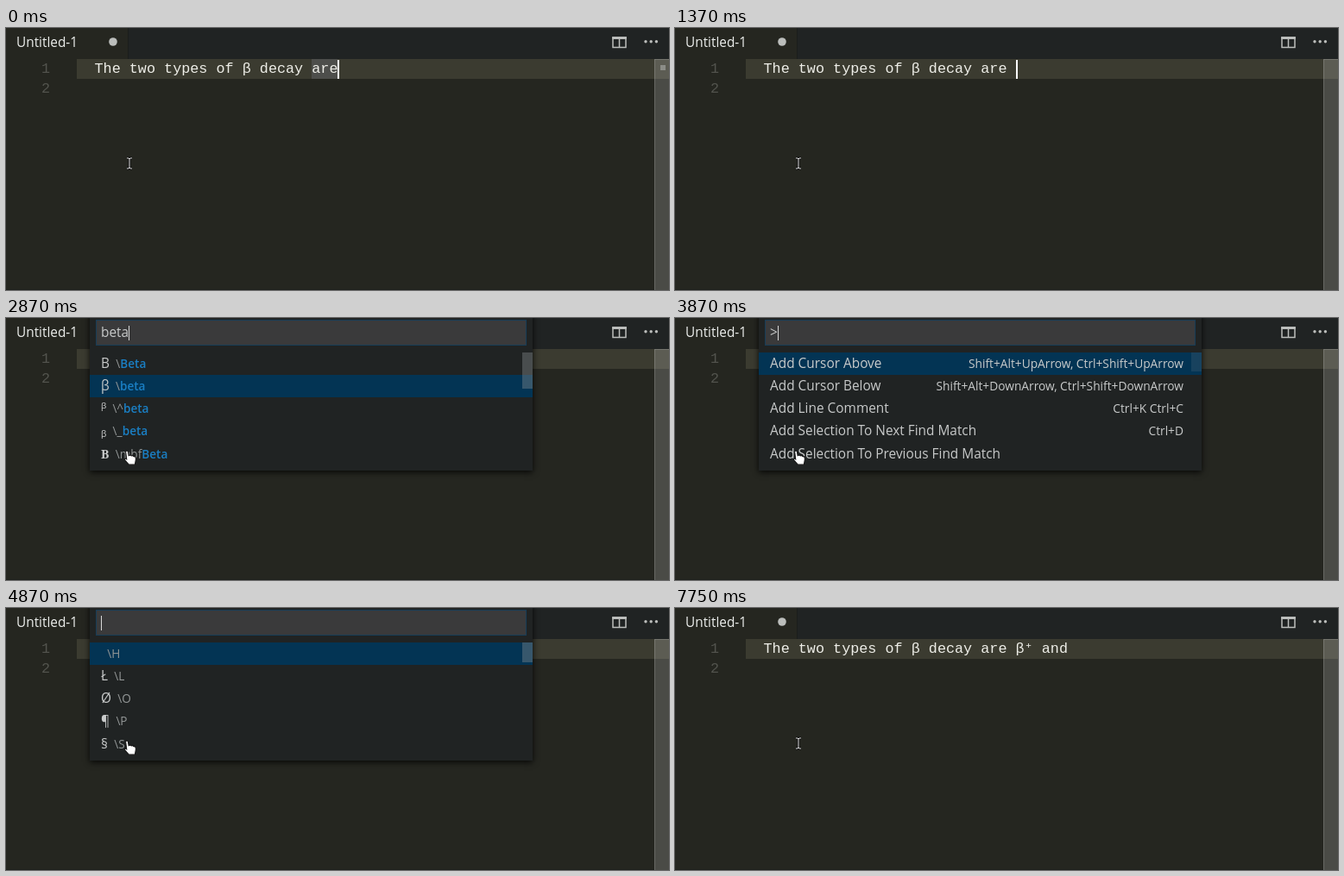
Animation of 768x304 px, one loop 8000 ms. Source, as an HTML page:

```html
<!DOCTYPE html>
<html lang="en">
<head>
<meta charset="utf-8">
<title>Symbol picker in a text editor</title>
<style>
  html, body { margin: 0; width: 100%; height: 100%; overflow: hidden; background: #252620; }
  #stage {
    position: relative; width: 768px; height: 304px; overflow: hidden; background: #252620;
    font: 15.4px "Open Sans", "Noto Sans", "DejaVu Sans", sans-serif; color: #c8caca; white-space: pre;
  }
  #stage div, svg { position: absolute; }
  .bar { left: 141px; top: 0; width: 627px; height: 36px; background: #202323; border-left: 1px solid #1b1d1b; box-sizing: border-box; }
  .title { left: 12px; top: 0; line-height: 33px; font-weight: 500; color: #eceeec; }
  .mono { font: 16.8px/23px "Liberation Mono", "DejaVu Sans Mono", monospace; }
  .number { left: 41px; color: #53544e; }
  .line { left: 82px; top: 36px; width: 686px; height: 23px; background: #3b3b30; }
  #text { left: 102.5px; top: 36px; color: #eeeee8; }
  #text .word { background: #4d4e4b; display: inline-block; height: 23px; vertical-align: top; }
  #text .caret { display: inline-block; width: 2px; height: 22px; margin: 1px -2px 0 0; background: #fff; vertical-align: top; }
  .ruler { left: 751px; top: 36px; width: 17px; height: 268px; box-sizing: border-box; background: rgba(255,255,255,.17); border: solid rgba(255,255,255,.16); border-width: 1px 0 0 1px; }
  #mark { left: 758px; top: 43px; width: 6px; height: 6px; background: #8c8d88; }
  .foot { left: 0; top: 303px; width: 751px; height: 1px; background: #1e201c; }
  #panel { left: 97px; top: -8px; width: 513px; background: #202323; box-shadow: 0 2px 7px rgba(0,0,0,.85); }
  .input { left: 7px; top: 9.5px; width: 499px; height: 30px; box-sizing: border-box; background: #3a3a3b; border: 1px solid #173d57; line-height: 28px; padding-left: 5px; }
  .input .caret { display: inline-block; width: 1px; height: 17px; background: #d8d8d8; vertical-align: middle; }
  .row { left: 0; width: 500px; height: 26.15px; line-height: 26.15px; padding-left: 13px; }
  .row.on { background: #033454; }
  .row b { color: #1a7fc4; font-weight: 600; }
  .keys { right: 21px; top: 0; font-size: 13.76px; }
  .code { font-size: 13.6px; color: #929696; margin-left: 7.3px; }
  .bold { font-family: "Noto Serif", "Liberation Serif", serif; font-weight: 700; font-size: 14px; }
  .slider { right: 0; top: 47.9px; width: 12px; background: rgba(140,145,148,.38); }
  .slider.faint { opacity: .4; }
</style>
</head>
<body>
<div id="stage">
  <div class="bar"></div>
  <div class="title">Untitled-1</div>
  <div class="line"></div>
  <div class="mono number" style="top:36px">1</div>
  <div class="mono number" style="top:59px">2</div>
  <div id="text" class="mono"></div>
  <div class="foot"></div>
  <div class="ruler"></div>
  <div id="mark"></div>
  <svg width="768" height="36" style="left:0;top:0" fill="#bcbebc">
    <circle cx="124" cy="16" r="4.8"/>
    <path d="M703 11H718V22.5H703ZM710.5 11V22.5" fill="none" stroke="#bcbebc" stroke-width="1.5"/>
    <path d="M702.2 10H718.8V13H702.2Z"/>
    <circle cx="741" cy="15.7" r="1.7"/><circle cx="747.2" cy="15.7" r="1.7"/><circle cx="753.4" cy="15.7" r="1.7"/>
  </svg>
  <div id="panel"></div>
  <svg id="beam" width="12" height="18" style="left:137px;top:148px">
    <path d="M3 3H5L6 4L7 3H9M6 4V14M3 15H5L6 14L7 15H9" fill="none" stroke="#111" stroke-width="3"/>
    <path d="M3 3H5L6 4L7 3H9M6 4V14M3 15H5L6 14L7 15H9" fill="none" stroke="#ddd"/>
  </svg>
  <svg id="hand" width="19.8" height="22" viewBox="0 0 18 20" style="left:134px;top:152px">
    <path d="M4.2 2.5Q5.5 1.2 6.7 2.6L7.4 7L9 6.4L10.2 7.2L11.6 6.8L12.6 7.8L14 7.8Q15 9 14.9 11L14 16.5H7.6L3.2 11.5Q2.6 9.8 4.4 10.2L5.2 10.8Z" fill="#fff" stroke="#151515"/>
  </svg>
</div>
<script>
const LOOP = 8000, ROW = 26.15, LIST_TOP = 47.9;
const $ = id => document.getElementById(id);

function el(tag, cls, ...children) {
  const node = document.createElement(tag);
  node.className = cls;
  node.append(...children);
  return node;
}

const allCommands = [
  ["Add Cursor Above", "Shift+Alt+UpArrow, Ctrl+Shift+UpArrow"],
  ["Add Cursor Below", "Shift+Alt+DownArrow, Ctrl+Shift+DownArrow"],
  ["Add Line Comment", "Ctrl+K Ctrl+C"],
  ["Add Selection To Next Find Match", "Ctrl+D"],
  ["Add Selection To Previous Find Match", ""]
];
const filtered = [
  ["Cursor Undo", "Ctrl+U"],
  ["Transform to Uppercase", ""],
  ["Unfold", "Ctrl+Shift+]"],
  ["Unfold All", "Ctrl+K Ctrl+J"],
  ["Unicode: Insert Math Symbol", ""]
];
const symbols = [["", "\\H"], ["Ł", "\\L"], ["Ø", "\\O"], ["¶", "\\P"], ["§", "\\S"]];
const betas = [["Β", "\\Beta"], ["β", "\\beta"], ["ᵝ", "\\^beta"], ["ᵦ", "\\_beta"], ["B", "\\mbfBeta", "bold"]];
const raised = [["⁽", "\\^("], ["⁾", "\\^)"], ["⁺", "\\^+"], ["⁻", "\\^-"], ["⁰", "\\^0"]];

const command = (match, rows) => ({ query: ">" + match, match, rows, commands: true, slider: match ? 0 : 22, selected: 0 });
const symbol = (query, rows, slider = 0, selected = 0) => ({ query, match: query, rows, slider, selected });

const sentence = "The two types of β decay are";
const before = sentence + " ", beta = before + "β", plus = beta + "⁺";

// Each step: start time, line text, open panel, caret hidden
const steps = [
  [0, sentence],
  [120, before],
  [500, before, command("", allCommands)],
  [750, before, command("u", filtered)],
  [870, before, command("un", [filtered[0], ...filtered.slice(2)])],
  [1000, before, command("uni", filtered.slice(4))],
  [1370, before],
  [1620, before, symbol("", symbols, 23)],
  [2000, before, symbol("b", betas, 23)],
  [2120, before, symbol("be", betas, 30)],
  [2370, before, symbol("bet", betas, 40)],
  [2500, before, symbol("beta", betas, 42)],
  [2870, before, symbol("beta", betas, 42, 1)],
  [3000, before],
  [3120, beta],
  [3870, beta, command("", allCommands)],
  [4120, beta, command("u", filtered)],
  [4250, beta, command("un", [filtered[0], ...filtered.slice(2)])],
  [4370, beta, command("uni", filtered.slice(4))],
  [4750, beta],
  [4870, beta, symbol("", symbols, 23)],
  [5500, beta, symbol("^", raised, 30)],
  [5620, beta, symbol("^+", [raised[2]])],
  [6000, beta, symbol("^+", [raised[2]]), true],
  [6620, beta],
  [6750, plus],
  [7120, plus + " "],
  [7250, plus + " a"],
  [7370, plus + " an"],
  [7500, plus + " and"],
  [7620, plus + " and "],
  [7750, plus + " and ", null, true]
];

function highlight(label, query) {
  const at = query ? label.toLowerCase().indexOf(query) : -1;
  if (at < 0) return [label];
  const end = at + query.length;
  return [label.slice(0, at), el("b", "", label.slice(at, end)), label.slice(end)];
}

function drawRow([first, second, style = ""], index, panel) {
  const row = el("div", index === panel.selected ? "row on" : "row");
  row.style.top = LIST_TOP + index * ROW + "px";
  if (panel.commands) row.append(...highlight(first, panel.match), el("div", "keys", second));
  else row.append(el("span", style, first), el("span", "code", ...highlight(second, panel.match)));
  return row;
}

function drawPanel(panel, caretHidden) {
  const input = el("div", "input", panel.query);
  if (!caretHidden) input.append(el("span", "caret"));
  const rows = panel.rows.map((item, i) => drawRow(item, i, panel));
  const slider = el("div", panel.commands ? "slider faint" : "slider");
  slider.style.height = panel.slider + "px";
  $("panel").replaceChildren(input, ...rows, slider);
  $("panel").style.height = LIST_TOP + rows.length * ROW + 6.5 + "px";
}

const show = (id, visible) => { $(id).style.display = visible ? "" : "none"; };

function draw([, text, panel, caretHidden]) {
  const marked = text === sentence;
  const parts = marked ? [text.slice(0, -3), el("span", "word", "are")] : [text];
  if (!caretHidden) parts.push(el("span", "caret"));
  $("text").replaceChildren(...parts);
  if (panel) drawPanel(panel, caretHidden);
  const covered = panel && panel.rows.length > 4;
  show("mark", marked);
  show("panel", panel);
  show("beam", !covered);
  show("hand", covered);
}

let current;
function tick() {
  const time = performance.now() % LOOP;
  const step = steps.findLast(([start]) => start <= time);
  if (step !== current) draw(current = step);
  requestAnimationFrame(tick);
}
tick();
</script>
</body>
</html>
```
